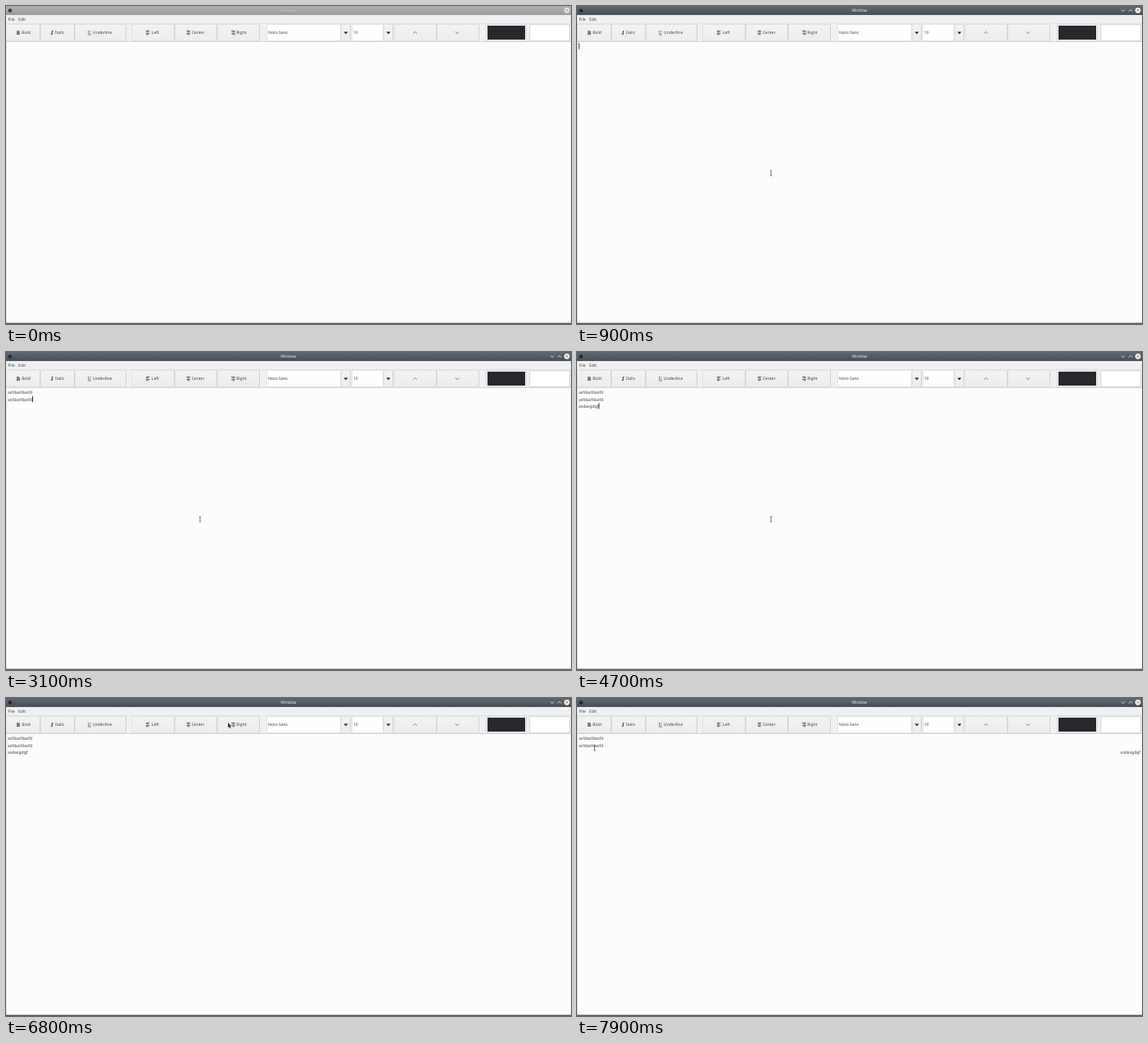
These frames come from a looping animation (690 by 388 pixels, 8000 ms). An HTML page with a canvas:

```html
<!DOCTYPE html>
<html lang="en">
<head>
<meta charset="utf-8">
<title>Text editor</title>
<style>
  html, body { margin: 0; width: 100%; height: 100%; overflow: hidden; background: #fcfcfc; }
  canvas { display: block; width: 100vw; height: 100vh; }
</style>
</head>
<body>
<canvas id="stage"></canvas>
<script>
const W = 690, H = 388, LOOP = 8000;
const canvas = document.getElementById('stage');
const ratio = window.devicePixelRatio || 1;
canvas.width = W * ratio;
canvas.height = H * ratio;
const ctx = canvas.getContext('2d');
ctx.scale(ratio, ratio);
if ('textRendering' in ctx) ctx.textRendering = 'geometricPrecision';

const SANS = '5px "Noto Sans", sans-serif';
const INK = '#3a3d40';

// [time, number of characters typed so far]
const LINES = [
  { text: 'asfdasfdasfd', keys: [[2300, 2], [2400, 5], [2500, 8], [2600, 12]] },
  { text: 'asfdasfdasfd', keys: [[2700, 3], [2900, 6], [3000, 9], [3100, 12]] },
  { text: 'asdasgdgf', keys: [[3400, 0], [3700, 2], [3800, 3], [4000, 5], [4100, 6], [4200, 7], [4300, 8], [4400, 9]] }
];
const ALIGN_RIGHT_AT = 7000;

// [time, x, y] of the pointer
const POINTER = [
  [400, 108, 272], [700, 237, 204], [1100, 237, 204], [1400, 238, 218], [1800, 237, 204],
  [5100, 237, 204], [5300, 227, 195], [5700, 238, 80], [6000, 262, 33], [6300, 271, 30],
  [7000, 271, 30], [7300, 170, 45], [7800, 21.5, 61]
];

const THEMES = {
  fading:   { top: '#b0b2b4', bottom: '#989b9e', title: '#b4b6b8', chevron: '#a9acae', close: '#e6e7e8', cross: '#8d9093', icon: '#35383b' },
  inactive: { top: '#f0f0f1', bottom: '#ebecee', title: '#c0c2c4', chevron: '#c4c6c8', close: '#a9abad', cross: '#eeeeef', icon: '#4a4d50' },
  active:   { top: '#616a73', bottom: '#464e57', title: '#eff0f1', chevron: '#eff0f1', close: '#f6f6f6', cross: '#4b535c', icon: '#23282d' }
};

function rect(x, y, w, h, fill) {
  ctx.fillStyle = fill;
  ctx.fillRect(x, y, w, h);
}

function gradientRect(x, y, w, h, top, bottom) {
  const g = ctx.createLinearGradient(0, y, 0, y + h);
  g.addColorStop(0, top);
  g.addColorStop(1, bottom);
  rect(x, y, w, h, g);
}

function frame(x, y, w, h, color) {
  ctx.strokeStyle = color;
  ctx.lineWidth = 1;
  ctx.strokeRect(x + 0.5, y + 0.5, w - 1, h - 1);
}

function text(s, x, y, { color = INK, align = 'left', font = SANS } = {}) {
  ctx.font = font;
  ctx.fillStyle = color;
  ctx.textAlign = align;
  ctx.fillText(s, x, y);
}

function line(points, color, width) {
  ctx.strokeStyle = color;
  ctx.lineWidth = width;
  ctx.beginPath();
  points.forEach(([x, y]) => ctx.lineTo(x, y));
  ctx.stroke();
}

function shape(points, fill) {
  ctx.fillStyle = fill;
  ctx.beginPath();
  points.forEach(([x, y]) => ctx.lineTo(x, y));
  ctx.closePath();
  ctx.fill();
}

function disc(x, y, r, fill) {
  ctx.fillStyle = fill;
  ctx.beginPath();
  ctx.arc(x, y, r, 0, Math.PI * 2);
  ctx.fill();
}

// dir: 1 points down, -1 points up
function chevron(x, y, dir, color) {
  line([[x - 2.3, y - dir * 1.1], [x, y + dir * 1.1], [x + 2.3, y - dir * 1.1]], color, 0.8);
}

function titleBar(theme) {
  gradientRect(0, 0, W, 11, theme.top, theme.bottom);
  disc(5, 5.5, 2.3, theme.icon);
  text('Window', 345, 7.3, { color: theme.title, align: 'center' });
  chevron(667, 5.5, 1, theme.chevron);
  chevron(676, 5.5, -1, theme.chevron);
  disc(685, 5.3, 3.4, theme.close);
  line([[683.6, 3.9], [686.4, 6.7]], theme.cross, 0.7);
  line([[686.4, 3.9], [683.6, 6.7]], theme.cross, 0.7);
}

function button(left, right) {
  gradientRect(left, 22, right - left, 21, '#f3f3f3', '#ececed');
  frame(left, 22, right - left, 21, '#dfe0e1');
  rect(right - 1, 23, 1, 19, '#cfd0d2');
}

// Three text lines shifted by the alignment: 0 left, 0.5 center, 1 right
function alignIcon(x, align) {
  [4.5, 3, 4.5, 3].forEach((w, i) => rect(x + (4.5 - w) * align, 29.9 + i * 1.5, w, 0.75, INK));
}

function combo(left, right, value) {
  rect(left, 22.5, right - left, 20, '#fefefe');
  frame(left, 22, right - left, 21, '#e2e3e4');
  button(right, right + 12);
  text(value, left + 2, 34.4);
  shape([[right + 3.5, 31.4], [right + 8.5, 31.4], [right + 6, 34.2]], '#17191b');
}

function swatch(left, width, color) {
  rect(left - 2, 22, width + 4, 21, '#f6f6f6');
  frame(left - 2, 22, width + 4, 21, '#d9dadb');
  rect(left, 24, width, 17, color);
}

function toolbar() {
  rect(0, 11, W, 33, '#eff0f1');
  text('File', 2.5, 18);
  text('Edit', 15, 18);
  rect(0, 21, W, 1, '#e2e3e4');
  [[0, 42], [42, 84], [84, 147], [153, 206], [206, 258], [258, 310], [474, 526], [526, 578]]
    .forEach(([l, r]) => button(l, r));

  text('B', 12.8, 34.7, { font: 'bold 6.5px "Noto Serif", serif', color: '#222' });
  text('Bold', 19.3, 34.4);
  text('I', 54.8, 34.7, { font: 'italic bold 6.5px "Noto Serif", serif', color: '#222' });
  text('Italic', 60, 34.4);
  text('U', 99.8, 34, { font: '5.5px "Noto Serif", serif' });
  rect(99.8, 34.7, 4.2, 0.6, INK);
  text('Underline', 106, 34.4);

  [['Left', 171, 177.8, 0], ['Center', 220.5, 226.7, 0.5], ['Right', 275, 281.2, 1]]
    .forEach(([label, iconX, x, align]) => {
      alignIcon(iconX, align);
      text(label, x, 34.4);
    });

  combo(318, 409, 'Noto Sans');
  combo(422, 461, '10');
  chevron(499.5, 32.5, -1, '#55585b');
  chevron(551, 32.5, 1, '#55585b');
  swatch(588, 46, '#26282c');
  swatch(641, 46, '#ffffff');
  rect(0, 43, W, 1, '#d3d4d5');
}

function typedCount(keys, t) {
  return keys.reduce((n, [at, count]) => t >= at ? count : n, 0);
}

function documentText(t) {
  let caretX = 2, row = 0;
  LINES.forEach(({ text: full, keys }, i) => {
    if (t < keys[0][0]) return;
    const typed = full.slice(0, typedCount(keys, t));
    const right = i === 2 && t >= ALIGN_RIGHT_AT;
    text(typed, right ? 688 : 2, 51.2 + i * 8.5, { align: right ? 'right' : 'left' });
    caretX = 2 + ctx.measureText(typed).width;
    row = i;
  });
  const caretOn = t >= 400 && t < 5200 && !(t >= 1100 && t < 1600);
  if (caretOn) rect(caretX, 45.3 + row * 8.5, 0.9, 7.3, '#222');
}

function pointerAt(t) {
  const next = POINTER.findIndex(p => p[0] > t);
  if (next < 0) return POINTER[POINTER.length - 1].slice(1);
  const [t0, x0, y0] = POINTER[next - 1], [t1, x1, y1] = POINTER[next];
  const k = (t - t0) / (t1 - t0);
  return [x0 + (x1 - x0) * k, y0 + (y1 - y0) * k];
}

function pointer(t) {
  if (t < POINTER[0][0]) return;
  const [x, y] = pointerAt(t);
  if (y < 44) {
    const arrow = [[0, 0], [0, 6.2], [1.5, 5], [2.6, 7.2], [3.7, 6.6], [2.7, 4.6], [4.5, 4.4]]
      .map(([dx, dy]) => [x + dx, y + dy]);
    line([...arrow, arrow[0]], '#fafafa', 1);
    shape(arrow, '#2c2f32');
  } else {
    line([[x, y - 3], [x, y + 3]], '#4b4e51', 0.8);
    [-3, 3].forEach(dy => line([[x - 1.3, y + dy], [x + 1.3, y + dy]], '#4b4e51', 0.7));
  }
}

function draw(t) {
  rect(0, 0, W, H, '#fcfcfc');
  titleBar(t < 100 ? THEMES.fading : t < 900 ? THEMES.inactive : THEMES.active);
  toolbar();
  rect(0, 44, 0.7, H - 44, '#d5d6d7');
  documentText(t);
  rect(0, 386.6, W, 1.4, '#55585c');
  pointer(t);
}

function tick() {
  draw(performance.now() % LOOP);
  requestAnimationFrame(tick);
}
tick();
</script>
</body>
</html>
```
